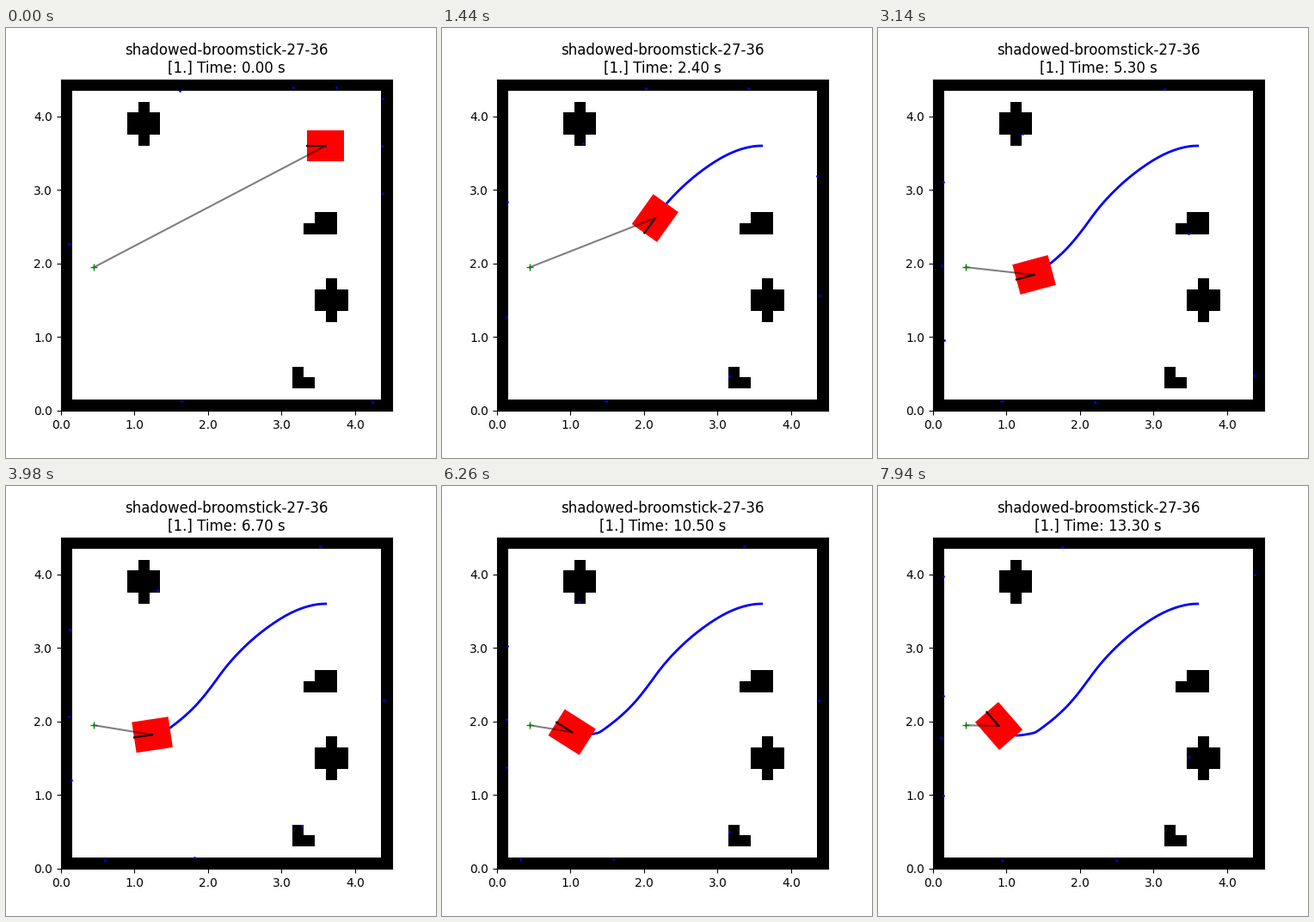
Recreate the animation shown at these times as a matplotlib script. Size 500 by 500 pixels, loop 8 s.

```python
import numpy as np
import matplotlib.pyplot as plt
from matplotlib.animation import FuncAnimation
from matplotlib.patches import Polygon

CELL, N = 0.15, 30
SIZE = CELL * N
GOAL = np.array([0.45, 1.95])
DT, STEPS = 0.1, 134

# time, x, y, heading (deg), speed
KNOTS = np.array([
    [0.0, 3.600, 3.600, 180.0, 0.15],
    [1.2, 2.978, 3.393, 212.0, 0.98],
    [2.4, 2.151, 2.618, 234.4, 0.88],
    [3.2, 1.797, 2.180, 225.0, 0.56],
    [4.0, 1.546, 1.961, 217.3, 0.28],
    [5.3, 1.377, 1.847, 195.1, 0.06],
    [8.2, 1.113, 1.815, 157.3, 0.04],
    [10.5, 1.022, 1.856, 147.65, 0.04],
    [13.3, 0.897, 1.940, 131.1, 0.03],
])


def unit(angle):
    return np.stack([np.cos(angle), np.sin(angle)], axis=-1)


def drive(times):
    """Positions and headings along a cubic Hermite path."""
    kt, pos = KNOTS[:, 0], KNOTS[:, 1:3]
    vel = unit(np.radians(KNOTS[:, 3])) * KNOTS[:, 4:]
    i = np.clip(np.searchsorted(kt, times, side="right") - 1, 0, len(kt) - 2)
    span = (kt[i + 1] - kt[i])[:, None]
    u = (times - kt[i])[:, None] / span
    p0, p1 = pos[i], pos[i + 1]
    m0, m1 = vel[i] * span, vel[i + 1] * span
    a = 2 * (p0 - p1) + m0 + m1
    b = 3 * (p1 - p0) - 2 * m0 - m1
    xy = ((a * u + b) * u + m0) * u + p0
    d = (3 * a * u + 2 * b) * u + m0
    return xy, np.arctan2(d[:, 1], d[:, 0])


def build_map():
    """Occupancy grid, row 0 at the top."""
    g = np.zeros((N, N), bool)
    g[[0, -1], :] = g[:, [0, -1]] = True
    for row, col in [(2, 6), (18, 23)]:
        g[row:row + 4, col + 1] = True
        g[row + 1:row + 3, col:col + 3] = True
    g[12:14, 23:25] = g[13, 22] = True
    g[26:28, 21] = g[27, 22] = True
    return g


GRID = build_map()
RANGES = np.linspace(0, 5, 100)
BEAMS = np.pi + np.radians(39.8) * np.arange(-4, 5)


def scan(xy, heading):
    """First sample of each beam that lies in an occupied cell."""
    pts = xy + RANGES[None, :, None] * unit(heading + BEAMS)[:, None, :]
    cells = np.clip(np.floor(pts / CELL).astype(int), 0, N - 1)
    hit = GRID[N - 1 - cells[..., 1], cells[..., 0]]
    return pts[np.arange(len(BEAMS)), hit.argmax(axis=1)]


def body(xy, heading, length=0.5, width=0.42):
    fwd = unit(heading) * length / 2
    side = unit(heading + np.pi / 2) * width / 2
    return [xy + fwd + side, xy + fwd - side, xy - fwd - side, xy - fwd + side]


path, headings = drive(np.arange(STEPS) * DT)

fig, ax = plt.subplots(figsize=(5, 5), dpi=100)
ax.imshow(GRID, cmap="gray_r", extent=(0, SIZE, 0, SIZE))
for axis in (ax.xaxis, ax.yaxis):
    axis.set_ticks(range(5))
    axis.set_major_formatter("{x:.1f}")
title = ax.set_title("")

trail, = ax.plot([], [], "b-", lw=2, zorder=2)
robot = Polygon(body(path[0], headings[0]), facecolor="red", lw=0, zorder=3)
ax.add_patch(robot)
to_goal, = ax.plot([], [], "k-", alpha=0.5, zorder=4)
nose, = ax.plot([], [], "k-", zorder=5)
ax.plot(*GOAL, "g+", zorder=5)
hits, = ax.plot([], [], "b.", ms=2, zorder=5)
ax.set_xlim(0, SIZE)
ax.set_ylim(0, SIZE)


def update(tick):
    # steps alternate between 20 ms and 100 ms
    k = tick // 6 * 2 + (tick % 6 > 0)
    xy, heading = path[k], headings[k]
    title.set_text(f"shadowed-broomstick-27-36\n[1.] Time: {k * DT:.2f} s")
    trail.set_data(*path[:k + 1].T)
    robot.set_xy(body(xy, heading))
    to_goal.set_data(*np.array([xy, GOAL]).T)
    nose.set_data(*np.array([xy, xy + 0.25 * unit(heading)]).T)
    hits.set_data(*scan(xy, heading).T)
    return title, trail, robot, to_goal, nose, hits


anim = FuncAnimation(fig, update, frames=400, interval=20, repeat=True,
                     repeat_delay=0)
plt.show()
```
